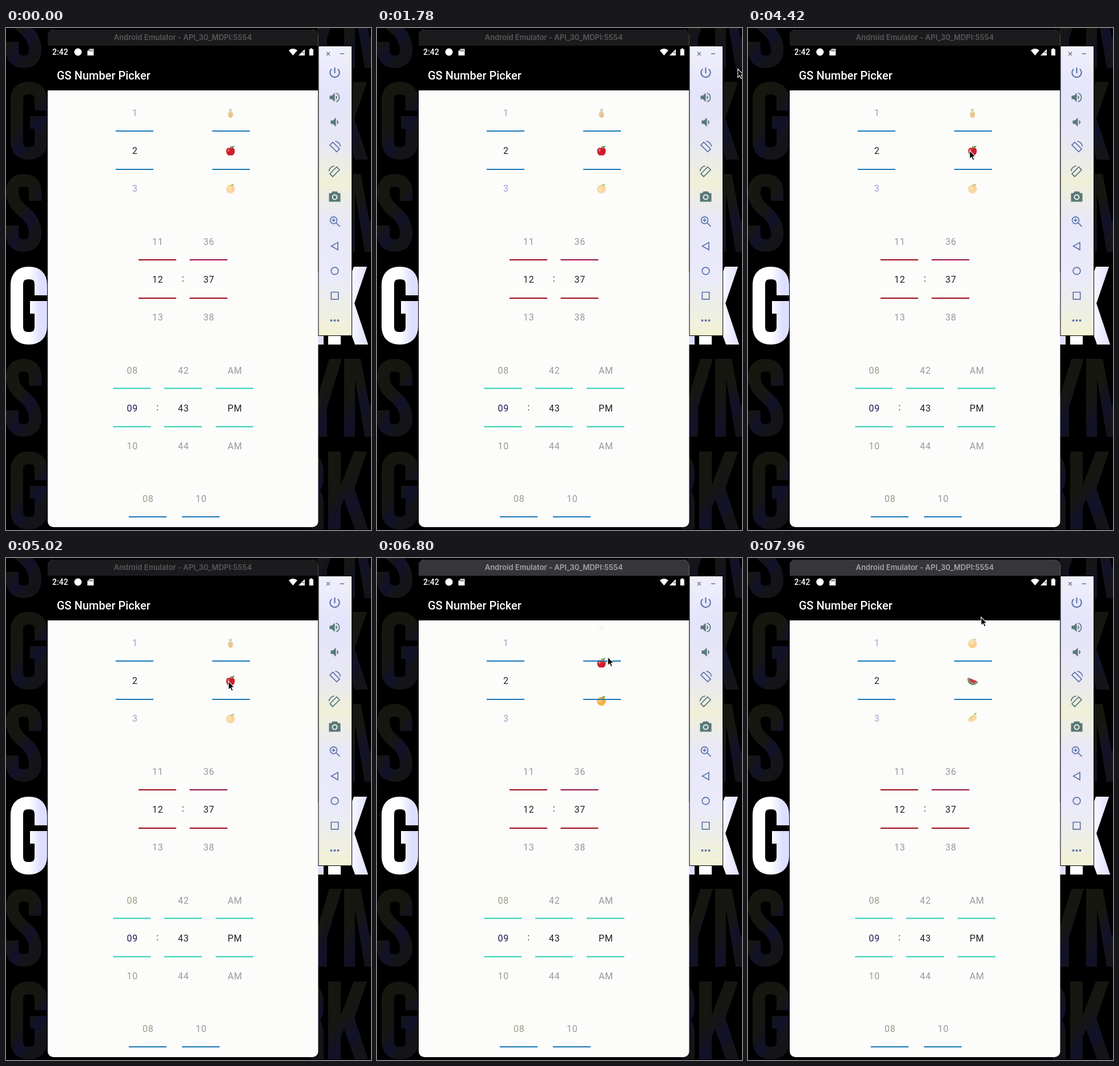
Write an HTML page that moves like this. It is 639 px wide and 877 px high and loops after 8000 ms.

```html
<!DOCTYPE html>
<html lang="en">
<head>
<meta charset="utf-8">
<title>Number picker</title>
<style>
  html, body { margin: 0; width: 100%; height: 100%; overflow: hidden; background: #000; }
  svg { display: block; width: 639px; height: 877px; }
  text { font-family: Roboto, sans-serif; }
  .num { font-size: 16px; letter-spacing: .6px; text-anchor: middle; }
  .bar { font: 600 13px Inter, sans-serif; text-anchor: middle; }
  .line { fill: none; stroke-width: 2; }
</style>
</head>
<body>
<svg id="stage" viewBox="0 0 639 877">
  <defs>
    <linearGradient id="dim" x1="0" y1="0" x2=".5" y2="1">
      <stop offset="0" stop-color="#17170f"/><stop offset=".5" stop-color="#161612"/>
      <stop offset=".8" stop-color="#11112b"/><stop offset="1" stop-color="#141418"/>
    </linearGradient>
    <linearGradient id="lit" x1="0" y1="0" x2="1" y2="0">
      <stop offset=".5" stop-color="#fff"/><stop offset="1" stop-color="#dedeff"/>
    </linearGradient>
    <linearGradient id="panel" x1="0" y1="0" x2="0" y2="1">
      <stop offset="0" stop-color="#f0f0fb"/><stop offset=".16" stop-color="#e4e4fc"/>
      <stop offset=".34" stop-color="#e8e8f4"/><stop offset=".47" stop-color="#f0f0d9"/>
      <stop offset=".6" stop-color="#e8e8f8"/><stop offset=".8" stop-color="#eaeafa"/>
      <stop offset="1" stop-color="#f2f2d4"/>
    </linearGradient>
    <linearGradient id="fade" x1="0" y1="0" x2="0" y2="1">
      <stop offset="0" stop-color="#000"/><stop offset=".36" stop-color="#fff"/>
      <stop offset=".64" stop-color="#fff"/><stop offset="1" stop-color="#000"/>
    </linearGradient>
    <mask id="wheelMask" maskUnits="userSpaceOnUse" x="361" y="115" width="66" height="199" style="color-interpolation:sRGB">
      <rect x="361" y="115" width="66" height="199" fill="url(#fade)"/>
    </mask>
  </defs>

  <rect width="639" height="877"/>
  <g id="wallpaper"></g>

  <!-- phone window -->
  <rect x="73" y="3" width="473.5" height="869" rx="10" fill="#fcfcfb"/>
  <path id="titleBar" d="M73 31V13Q73 3 83 3H536.5Q546.5 3 546.5 13V31Z"/>
  <text id="title" class="bar" x="309.5" y="21">Android Emulator - API_30_MDPI:5554</text>
  <rect x="73" y="31" width="473.5" height="78"/>
  <g fill="#fff">
    <text x="81" y="47" font-size="14" font-weight="500">2:42</text>
    <circle cx="126" cy="42" r="6.5"/>
    <path d="M146.5 36.5H153.5V48H142.5V40.5Z"/>
    <path d="M495 39Q502.5 33 510 39L502.5 48Z"/>
    <path d="M512 48L523 37V48Z"/>
    <path d="M531 37H533V35.5H536V37H538V48H531Z"/>
    <text x="89" y="90" font-size="20" font-weight="500">GS Number Picker</text>
  </g>
  <path d="M146 38V41M148.5 38V41M151 38V41M519 43H522" stroke="#000"/>
  <g id="pickers"></g>
  <g mask="url(#wheelMask)"><g id="wheel"></g></g>
  <g id="lines"></g>

  <!-- emulator tool panel -->
  <rect x="547" y="31.5" width="58.5" height="506" fill="url(#panel)" stroke="#000"/>
  <path d="M561 42L567 48M567 42L561 48M585 45H592" stroke="#6c7280" stroke-width="1.3"/>
  <g id="tools"></g>

  <path id="cursor" d="M0 0V15L3.4 11.8 5.6 17 8.2 15.9 6 10.8H10.5Z" fill="#000" stroke="#fff" stroke-width="1.1"/>
</svg>
<script>
const LOOP = 8000;
const el = id => document.getElementById(id);

// Wallpaper: condensed capitals, each row 136 high
const glyph = {
  S: 'M51 47V32Q51 11 31 11Q11 11 11 32Q11 50 31 66T51 104Q51 125 31 125Q11 125 11 104V90',
  G: 'M61 50V32Q61 11 40 11Q19 11 19 32V104Q19 125 40 125Q61 125 61 104V71H42',
  R: 'M520 11Q545 11 545 36V46Q545 66 528 66Q545 70 545 90V136',
  K: 'M564 0H586V59L609 0H632L610 64 634 136H611L592 83 586 97V136H564Z',
  Y: 'M566 0H588L562 85V136H540V85Z',
  M: 'M592 0H621L637 85 639 76V136H628L611 34V136H592Z'
};
const rows = [-66, 94, 255, 417, 578, 740];
el('wallpaper').innerHTML = rows.map((y, i) => {
  const paint = i === 3 ? 'url(#lit)' : 'url(#dim)';
  const stroke = c => `<path d="${glyph[c]}" fill="none" stroke="${paint}" stroke-width="22"/>`;
  const solid = c => `<path d="${glyph[c]}" fill="${paint}"/>`;
  const letters = i % 2 ? stroke('G') + stroke('R') + solid('K') : stroke('S') + solid('Y') + solid('M');
  return `<g transform="translate(0 ${y})">${letters}</g>`;
}).join('');

// Number columns: centre x, centre y, three values, colours
const GREY = '#99999e', LILAC = '#a29fcd', OLIVE = '#9b9b87', INK = '#202020';
const BLUE = '#1b78b8', RED = '#9c0c14', TEAL = '#2bd0b2';
const columns = [
  [225, 214, ['1', '2', '3'], LILAC, INK, BLUE],
  [394, 214, [], GREY, INK, BLUE],
  [265, 439, ['11', '12', '13'], GREY, INK, RED],
  [354.5, 439, ['36', '37', '38'], GREY, INK, RED, '#980f48'],
  [220.5, 663.5, ['08', '09', '10'], OLIVE, '#201b52', TEAL],
  [310, 663.5, ['42', '43', '44'], GREY, INK, TEAL],
  [400, 663.5, ['AM', 'PM', 'AM'], GREY, INK, TEAL],
  [248, 888, ['08'], OLIVE, INK, BLUE],
  [341, 888, ['10'], GREY, INK, BLUE]
];
const label = (x, y, s, color) => `<text class="num" x="${x}" y="${y}" fill="${color}">${s}</text>`;
el('pickers').innerHTML = columns.map(([x, y, values, side, main]) =>
  values.map((v, i) => label(x + .7, y + 6 + (i - 1) * 66, v, i === 1 ? main : side)).join('')).join('') +
  label(310, 443, ':', INK) + label(265.5, 668, ':', INK);
el('lines').innerHTML = columns.map(([x, y, , , , color, top = color]) => {
  const rule = (ly, c) => ly < 872 ? `<path class="line" d="M${x - 33} ${ly}h66" stroke="${c}"/>` : '';
  return rule(y - 34, top) + rule(y + 33, color);
}).join('');

// Fruit wheel, each fruit centred on 0,0
const fruits = [
  `<path d="M0-2L-4-7-1-6 0-9 1-6 4-7Z" fill="#55923c"/><ellipse cy="2.5" rx="4.5" ry="6" fill="#e0a03a"/>
   <path d="M-4 0L3 7M-3 6L4 0M-2-2L4 4" stroke="#a9691f" stroke-width=".8"/>`,
  `<path d="M0-4C-4-7-8-4-7.5 1C-7 6-4 9-1 8Q0 7.5 1 8C4 9 7 6 7.5 1C8-4 4-7 0-4Z" fill="#cf1e2b"/>
   <ellipse cx="-3.5" cy="-1" rx="1.7" ry="2.5" fill="#ec6b66"/><path d="M0-3Q0-6 1-8" stroke="#6b3a20" stroke-width="1.2" fill="none"/>
   <path d="M1-5Q2-9 7-8.5Q6-5 1-5Z" fill="#4c8f35"/>`,
  `<circle cy="1" r="7.7" fill="#f7a321"/><circle cx="-2" cy="-1" r="4" fill="#fbbd51"/>
   <path d="M0-5Q2-9 7-7.5Q5-4 0-5Z" fill="#5a9a3c"/>`,
  `<g transform="rotate(22)"><path d="M-9.5-2A9.5 9 0 0 0 9.5-2Z" fill="#2f7d3b"/><path d="M-8-2A8 7 0 0 0 8-2Z" fill="#e8e3b0"/>
   <path d="M-7.4-2.5A7.4 6.6 0 0 0 7.4-2.5Z" fill="#dc3f4d"/><path d="M-4-.5v1.5M0 0v1.6M4-.5v1.5" stroke="#40151a"/></g>`,
  `<g transform="rotate(-32)"><ellipse rx="8.5" ry="5.2" fill="#f1b33a"/><path d="M-8 1Q-3-5 4-4.7Q-1 0-8 1Z" fill="#a6b23d"/>
   <path d="M5-4Q8-8 11-4Q8-2 5-4Z" fill="#5a9a3c"/></g>`
];
el('wheel').innerHTML = fruits.map((f, i) => `<g transform="translate(393 ${148.5 + i * 66})">${f}</g>`).join('');

// Panel icons: outline path, filled path
const phone = 'M-3.5-8.5L8.5 3.5 3.5 8.5-8.5-3.5Z', swing = 'M1-10A10 10 0 0 1 10-1';
const tools = [
  ['M0-9V1M-5.3-6.3A8.2 8.2 0 1 0 5.3-6.3'],
  ['M2.5-7.6A8 8 0 0 1 2.5 7.6', 'M-9-3H-5L0-8V8L-5 3H-9ZM2-4Q7 0 2 4Z'],
  ['', 'M-7-3H-3L2-8V8L-3 3H-7ZM4-4Q9 0 4 4Z'],
  [phone + swing],
  [phone + swing, '', -1],
  ['', 'M-10-6H-6L-4-9H4L6-6H10V9H-10ZM0-4A5 5 0 0 0 0 6A5 5 0 0 0 0-4ZM0-2A3 3 0 0 1 0 4A3 3 0 0 1 0-2Z'],
  ['M-8-2A6 6 0 1 0 4-2A6 6 0 1 0-8-2M2.5 2.5L9 9M-5-2H1M-2-5V1'],
  ['M5.5-6.5V6.5L-6 0Z'],
  ['M-6.3 0A6.3 6.3 0 1 0 6.3 0A6.3 6.3 0 1 0-6.3 0'],
  ['M-6.2-6.2H6.2V6.2H-6.2Z'],
  ['', [-6, 0, 6].map(x => `M${x - 2} 0a2 2 0 1 0 4 0a2 2 0 1 0-4 0`).join('')]
];
const greenish = [1, 2, 4, 5];
el('tools').innerHTML = tools.map(([line, solid = '', flip = 1], i) => {
  const color = greenish.includes(i) ? '#587879' : '#5a73a8';
  return `<g transform="translate(575.5 ${78 + i * 43.3}) scale(${flip} 1)">
    <path d="${line}" fill="none" stroke="${color}" stroke-width="${i < 1 ? 2.1 : 1.7}"/>
    <path d="${solid}" fill="${color}" fill-rule="evenodd"/></g>`;
}).join('');

// Pointer track: time, x, y
const track = [
  [0, 645, 110], [680, 645, 100], [780, 629, 93], [1200, 630, 66], [1700, 631, 63],
  [2300, 636, 125], [2780, 636, 189], [3000, 620, 194], [3420, 535, 200], [4100, 400, 212],
  [4420, 388, 214], [5300, 390, 216], [5800, 404, 225], [6250, 404, 225], [6800, 404, 173],
  [7300, 406, 95], [7500, 407, 85], [7660, 407, 86], [7960, 408, 103], [8000, 408, 103]
];
const FOCUS_AT = 5400, RELEASE_AT = 7500, SLOP_Y = 204, SNAP = 132;

function pointerAt(t) {
  const i = track.findIndex(key => key[0] > t);
  const [a, b] = [track[i - 1], track[i]];
  const k = (t - a[0]) / (b[0] - a[0]);
  return [a[1] + (b[1] - a[1]) * k, a[2] + (b[2] - a[2]) * k];
}

function wheelOffset(t) {
  if (t < 5900) return 0;
  const drag = Math.max(0, SLOP_Y - pointerAt(Math.min(t, RELEASE_AT))[1]);
  const k = Math.min(1, Math.max(0, (t - RELEASE_AT) / 350));
  return drag + (SNAP - drag) * (1 - (1 - k) ** 3);
}

function draw(now) {
  const t = now % LOOP;
  const focused = t >= FOCUS_AT;
  el('cursor').setAttribute('transform', `translate(${pointerAt(t)})`);
  el('wheel').setAttribute('transform', `translate(0 ${-wheelOffset(t)})`);
  el('titleBar').setAttribute('fill', focused ? '#36363a' : '#1b1b1d');
  el('title').setAttribute('fill', focused ? '#a6a6a8' : '#58585a');
  requestAnimationFrame(draw);
}
draw(performance.now());
</script>
</body>
</html>
```
